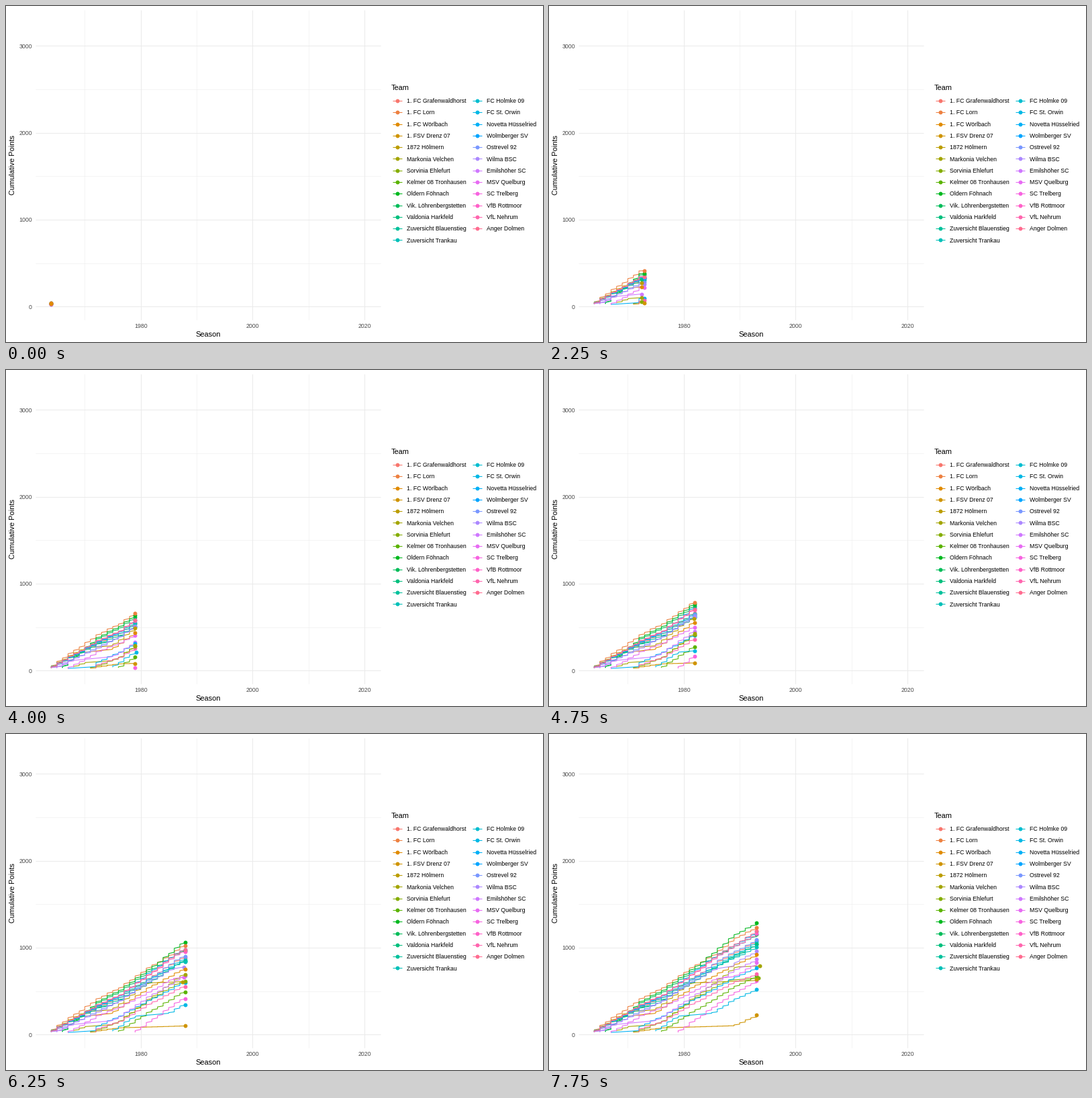
Recreate the animation shown at these times as a matplotlib script. Size 800x500 px, loop 8000 ms.

```python
import math

import matplotlib.pyplot as plt
import numpy as np
from matplotlib.animation import FuncAnimation

W, H = 800, 500
FRAMES, INTERVAL = 32, 250
PX = 0.72               # points per pixel at 100 dpi
SEASONS_PER_FRAME = 0.947
STEP = 58 / 199         # spacing of the revealed line samples
GAP_SLOPE = 20          # slower growth means the team is out of the league

plt.rcParams["font.family"] = "Liberation Sans"

NAMES = [
    "1. FC Grafenwaldhorst", "1. FC Lorn", "1. FC Wörlbach", "1. FSV Drenz 07",
    "1872 Hölmern", "Markonia Velchen", "Sorvinia Ehlefurt",
    "Kelmer 08 Tronhausen", "Oldern Föhnach", "Vik. Löhrenbergstetten",
    "Valdonia Harkfeld", "Zuversicht Blauenstieg", "Zuversicht Trankau",
    "FC Holmke 09", "FC St. Orwin", "Novetta Hüsselried", "Wolmberger SV",
    "Ostrevel 92", "Wilma BSC", "Emilshöher SC", "MSV Quelburg",
    "SC Trelberg", "VfB Rottmoor", "VfL Nehrum", "Anger Dolmen",
]


def hue_color(i, n=25, chroma=100, lum=65):
    """Evenly spaced hue in polar LUV, converted to sRGB."""
    h = math.radians(15 + 360 * i / n)
    y = ((lum + 16) / 116) ** 3
    u = chroma * math.cos(h) / (13 * lum) + 0.1978398
    v = chroma * math.sin(h) / (13 * lum) + 0.4683363
    x = 9 * y * u / (4 * v)
    z = -x / 3 - 5 * y + 3 * y / v
    rgb = np.array([
        3.240479 * x - 1.537150 * y - 0.498535 * z,
        -0.969256 * x + 1.875992 * y + 0.041556 * z,
        0.055648 * x - 0.204043 * y + 1.057311 * z,
    ]).clip(0, 1)
    curve = 1.055 * rgb ** (1 / 2.4) - 0.055
    return tuple(np.where(rgb > 0.00304, curve, 12.92 * rgb).clip(0, 1))


COLORS = [hue_color(i) for i in range(len(NAMES))]


def sx(year):
    return 200.7 + (year - 80) * 8.33


def sy(points):
    return 447.3 - points * 0.1293


class Team:
    def __init__(self, index, *knots, drift=0.0, snap=False):
        self.color = COLORS[index]
        self.index = index
        self.years, self.totals = np.array(knots, float).T
        self.drift, self.snap = drift, snap

    def place(self, t):
        """Stage position at time t; seasons snap to whole years in play."""
        total = np.interp(t, self.years, self.totals)
        seg = np.clip(np.searchsorted(self.years, t, side="right") - 1,
                      0, len(self.years) - 2)
        slope = (np.diff(self.totals) / np.diff(self.years))[seg]
        loose = t + self.drift * np.maximum(t - A, 0)
        in_play = (slope >= GAP_SLOPE) | self.snap
        return sx(np.where(in_play, np.round(t), loose)), sy(total)

    def path(self, now):
        start = self.years[0]
        if now < start:
            return [], []
        grid = np.arange(64, now, STEP)
        t = np.concatenate([[start], grid[grid > start], [now]])
        return self.place(t)


# Shared knot times, in years after 1900
A, B, C, D, E, F = 72.5, 76.3, 82, 85.8, 89.6, 93.4

# Listed from bottom to top
TEAMS = [
    Team(0, (64, 27), (A, 318), (B, 425), (C, 660), (D, 820), (F, 1085)),
    Team(13, (64, 30), (A, 330), (B, 428), (C, 640), (D, 795), (F, 1070)),
    Team(11, (64, 32), (A, 305), (B, 405), (C, 610), (D, 775), (F, 1045)),
    Team(10, (64, 38), (72, 310), (75, 335), (76, 385), (C, 620), (E, 925),
         (F, 1040)),
    Team(12, (64, 36), (A, 335), (B, 447), (C, 655), (D, 780), (F, 1010)),
    Team(16, (64, 32), (A, 325), (B, 445), (C, 725), (D, 905), (F, 1185)),
    Team(17, (65, 30), (A, 277), (B, 385), (C, 645), (D, 832), (E, 968),
         (F, 1092)),
    Team(18, (64, 26), (A, 255), (B, 390), (C, 620), (D, 758), (89, 790),
         (E, 845), (F, 960)),
    Team(19, (65, 28), (68, 118), (75, 160), (B, 205), (C, 452), (D, 590),
         (E, 755), (F, 866)),
    Team(20, (67, 20), (A, 217), (B, 315), (C, 500), (D, 645), (89, 667),
         (E, 685), (F, 828)),
    Team(21, (79, 25), (C, 162), (D, 334), (E, 495), (F, 622)),
    Team(9, (66, 30), (A, 365), (B, 490), (C, 742), (D, 900), (F, 1155)),
    Team(22, (64, 33), (A, 340), (B, 450), (C, 700), (D, 885), (F, 1165)),
    Team(24, (64, 30), (A, 345), (B, 455), (C, 707), (D, 900), (F, 1198)),
    Team(15, (67, 25), (72, 45), (A, 97), (B, 212), (C, 405), (D, 530),
         (E, 670), (F, 772)),
    Team(14, (75, 38), (B, 95), (79, 212), (C, 228), (85, 245), (D, 268),
         (E, 418), (F, 525)),
    Team(7, (76, 33), (C, 272), (D, 415), (E, 565), (F, 680)),
    Team(23, (72, 30), (A, 68), (B, 150), (C, 362), (D, 490), (E, 615),
         (F, 697)),
    Team(6, (71, 30), (72, 55), (73, 62), (B, 155), (C, 410), (D, 555),
         (88, 625), (F, 650)),
    Team(5, (68, 40), (70, 92), (75, 115), (B, 150), (C, 425), (D, 605),
         (E, 780), (F, 790), drift=0.014),
    Team(3, (71, 25), (73, 48), (B, 78), (C, 88), (89, 102), (E, 118),
         (F, 225), snap=True),
    Team(8, (66, 33), (A, 380), (B, 508), (C, 765), (D, 959), (E, 1162),
         (F, 1290)),
    Team(4, (64, 38), (70, 262), (75, 285), (B, 352), (81, 580), (C, 595),
         (92.9, 622), (F, 637), drift=-0.014),
    Team(1, (64, 42), (A, 413), (B, 537), (C, 787), (D, 930), (E, 1120),
         (F, 1237)),
    Team(2, (64, 32), (69, 205), (75, 245), (B, 310), (C, 555), (D, 685),
         (E, 815), (F, 920)),
]

fig = plt.figure(figsize=(W / 100, H / 100), dpi=100, facecolor="white")
ax = fig.add_axes([0, 0, 1, 1])
ax.set_xlim(0, W)
ax.set_ylim(H, 0)
ax.axis("off")


def label(x, y, text, size=8.8, color="black", ha="left", rotation=0):
    """Text whose capitals are centred on y (or on x when upright)."""
    shift = 0.36 * size
    x, y = (x + shift, y) if rotation else (x, y + shift)
    ax.text(x, y, text, size=size * PX, color=color, ha=ha, va="baseline",
            rotation=rotation, rotation_mode="anchor")


def stroke(xs, ys, color, width=1.07, z=1):
    return ax.plot(xs, ys, color=color, lw=width * PX, zorder=z,
                   solid_capstyle="butt", solid_joinstyle="round")[0]


def dot(xs, ys, color, z=3):
    return ax.plot(xs, ys, "o", color=color, ms=5.9 * PX, mew=0, zorder=z)[0]


def draw_panel():
    left, right, top, bottom = 44, 558, 6, 467
    for year in range(70, 121, 10):
        major = year % 20 == 0
        stroke([sx(year)] * 2, [top, bottom], "#EBEBEB",
               1.07 if major else 0.53)
        if major:
            label(sx(year), 476, str(1900 + year), color="#4D4D4D",
                  ha="center")
    for points in range(0, 3001, 500):
        major = points % 1000 == 0
        stroke([left, right], [sy(points)] * 2, "#EBEBEB",
               1.07 if major else 0.53)
        if major:
            label(39, sy(points) + 0.3, str(points), color="#4D4D4D",
                  ha="right")
    label(301, 488.5, "Season", 11, ha="center")
    label(9.3, 236.5, "Cumulative Points", 11, ha="center", rotation=90)


def draw_legend():
    label(574, 121, "Team", 11)
    for i, name in enumerate(NAMES):
        col, row = divmod(i, 13)
        x, y = 582.6 + 119.2 * col, 141 + 17.28 * row
        stroke([x - 6.9, x + 6.9], [y, y], COLORS[i])
        dot([x], [y], COLORS[i])
        label(x + 14.4, y, name)


draw_panel()
draw_legend()
lines = [stroke([], [], team.color, z=4 + team.index / 100) for team in TEAMS]
dots = [dot([], [], team.color, z=5 + i / 100) for i, team in enumerate(TEAMS)]


def update(frame):
    now = 64 + SEASONS_PER_FRAME * frame
    for team, line, head in zip(TEAMS, lines, dots):
        xs, ys = team.path(now)
        line.set_data(xs, ys)
        head.set_data(xs[-1:], ys[-1:])
    return lines + dots


anim = FuncAnimation(fig, update, frames=FRAMES, interval=INTERVAL,
                     repeat=True, repeat_delay=0, blit=False)
plt.show()
```
